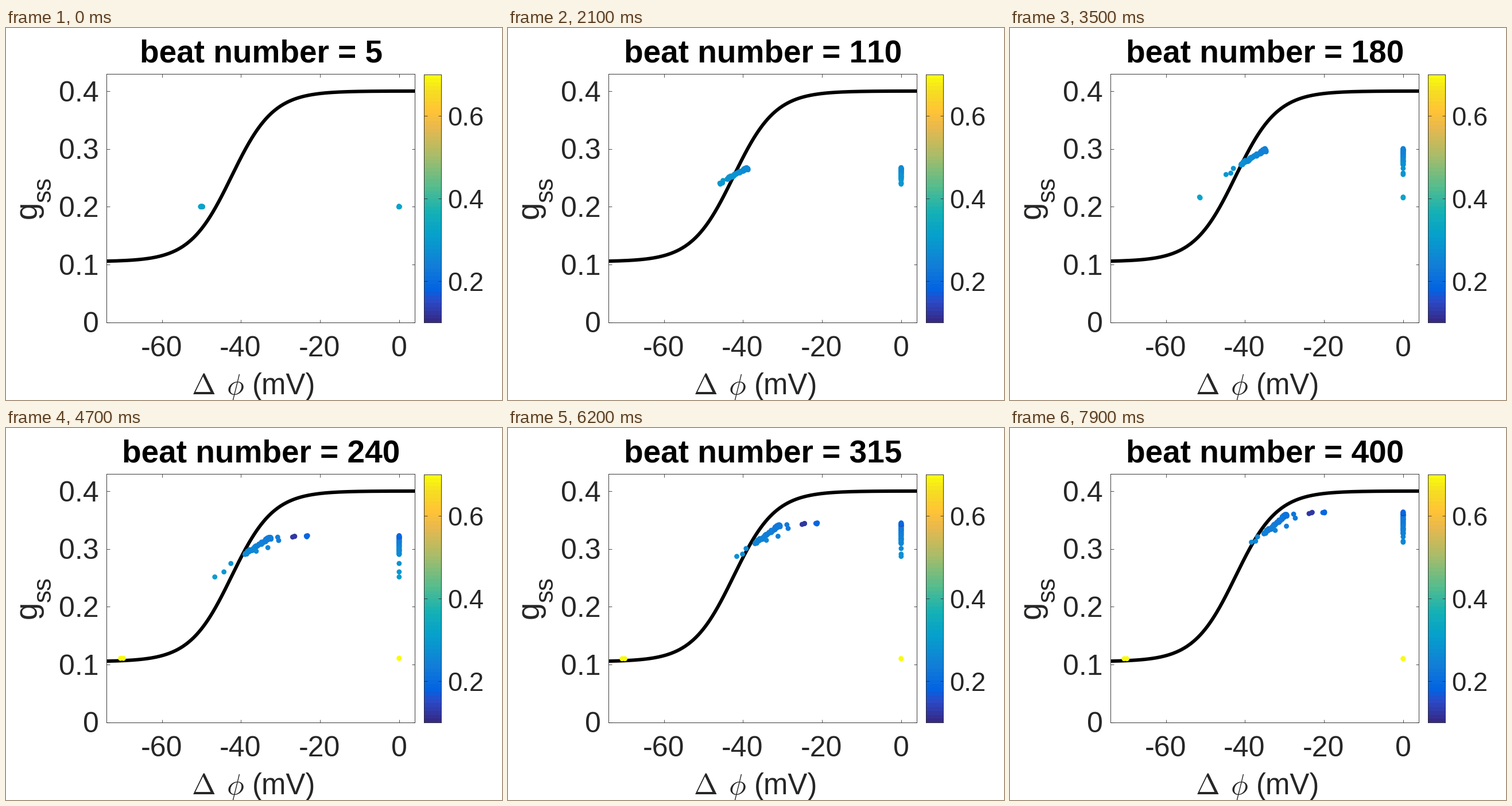
Recreate the animation shown at these times as a matplotlib script. Size 864 by 648 pixels, loop 8000 ms.

```python
import matplotlib.pyplot as plt
import numpy as np
from matplotlib.animation import FuncAnimation
from matplotlib.colors import LinearSegmentedColormap

W, H, DPI = 864, 648, 72          # at 72 dpi one point is one pixel
FRAMES, INTERVAL = 80, 100
INK = "#262626"

plt.rcParams["font.family"] = "Liberation Sans"
plt.rcParams["mathtext.fontset"] = "cm"
plt.rcParams["text.kerning_factor"] = 6   # practically no kerning

# colour stops on a 64-step scale
STOPS = [(0, "#352a87"), (5, "#2c4ac7"), (8, "#0363e1"), (14, "#127dd8"),
         (22, "#06a0cd"), (28, "#15b1b4"), (35, "#59bd8c"), (43, "#aebc67"),
         (50, "#e9b94e"), (54, "#ffc337"), (59, "#f5de21"), (63, "#f9fb0e")]
parula = LinearSegmentedColormap.from_list("p", [(k / 63, c) for k, c in STOPS], N=64)

# Cells are ranked by u: 0 to 1 is the main cloud, below 0 lags, above 1 leads.
# Some step sideways by dx once their neighbours fail; a few also change colour.
rng = np.random.default_rng(4)
CLOUD = [(u, 0, np.nan) for u in np.linspace(0, 1, 64)]
LAGGARDS = [(u, 0, np.nan) for u in (-.35, -.25, -.15)]
SIDE = [(.1, 2.2, np.nan), (.3, 3.2, np.nan), (.7, 3, np.nan), (1, 2, np.nan)]
DARK = [(1.15 + .1 * k, 5.8 + .3 * k, .12) for k in range(3)]
BLUE = [(1.15 + .1 * k, 9.2 + .3 * k, .185) for k in range(3)]
FAILING = [(-.35, 0, .7)] * 2

U, DX, FINAL = np.array(CLOUD + LAGGARDS + SIDE + DARK + BLUE + FAILING).T
FAILS = FINAL == .7
SHIFT = rng.uniform(-.25, .25, U.size)
NOISE = rng.normal(-.0003, .0012, U.size)
REST = np.where(np.arange(U.size) % 2, -70.6, -69.9)


def step(beat, centre, width):
    return 1 / (1 + np.exp((centre - beat) / width))


def pose(beat):
    t = beat - 5
    lag = (1 - U) ** 2
    x = -50 + SHIFT + (20 + 2 * U) * (1 - np.exp(-t / (150 + 150 * lag)))
    g = .2 + (.19 + .022 * U) * (1 - np.exp(-t / (280 + 80 * lag)))
    g += NOISE * min(t / 150, 1)

    # laggards fall behind for a while around the failure
    dip = np.where(FAILS, 0, np.minimum(U, 0)) * np.exp(-((beat - 250) / 60) ** 2)
    x += 14 * dip
    g += .08 * dip

    jump = step(beat, 212, 5)
    fall = step(beat, 188, 9.4)
    x += DX * jump
    value = .25 - .0048 * (x - DX * jump + 36)
    x = np.where(FAILS, x + fall * (REST - x), x)
    g = np.where(FAILS, g + fall * (.11 - g), g)
    turn = np.where(FAILS, fall ** 2, jump)
    value = np.where(np.isnan(FINAL), value, value + turn * (FINAL - value))
    return x, g, value


fig = plt.figure(figsize=(W / DPI, H / DPI), dpi=DPI, facecolor="white")


def label(x, y, s, size, **kw):
    kw = {"color": INK, "ha": "center", "va": "baseline", **kw}
    return fig.text(x / W, 1 - y / H, s, fontsize=size, **kw)


def panel(left, top, right, bottom):
    ax = fig.add_axes([left / W, 1 - bottom / H, (right - left) / W, (bottom - top) / H])
    ax.tick_params(direction="in", length=5.5, width=.8, color=INK, top=True, right=True,
                   labelbottom=False, labelleft=False)
    for s in ax.spines.values():
        s.set(color=INK, linewidth=.9)
    return ax


ax = panel(175.4, 79.6, 712.4, 512.6)
ax.set(xlim=(-74, 4), ylim=(0, .43), xticks=range(-60, 1, 20),
       yticks=np.arange(5) / 10)
v = np.linspace(-74, 4, 400)
ax.plot(v, .105 + .295 * step(v, -42.4, 5.3), color="black", lw=6)

for x in range(-60, 1, 20):
    label(684.5 + 6.88 * x - (x < 0), 572.5, str(x), 50)
for k in range(5):
    label(161.5, 530.5 - 100.7 * k, f"{k / 10:g}", 50, ha="right")

bar = panel(728.4, 80.6, 758.4, 512.6)
bar.imshow(np.arange(64)[:, None], cmap=parula, origin="lower", aspect="auto",
           extent=(0, 1, .1, .7), interpolation="nearest")
bar.set(xticks=[], yticks=[.2, .4, .6])
for c in (.2, .4, .6):
    label(769.5, 601.5 - 720 * c, f"{c:g}", 45.5, ha="left")

label(343.5, 638, r"$\Delta$", 50)
label(399.5, 638, r"$\phi$", 50)
label(484, 638, "(mV)", 51)
upright = dict(ha="left", rotation=90, rotation_mode="anchor")
label(53, 332, "g", 55, **upright)
label(78, 303, "ss", 44, **upright)

title = label(444.5, 60, "", 55, color="black", weight="bold")
style = dict(s=78, linewidths=0, cmap=parula, vmin=.1, vmax=.7, zorder=3)
zero = np.zeros(U.size)
cells = ax.scatter(zero, zero, c=zero, **style)
column = ax.scatter(zero, zero, c=zero, **style)


def draw(i):
    beat = 5 * (i + 1)
    x, g, value = pose(beat)
    title.set_text(f"beat number = {beat}")
    cells.set_offsets(np.column_stack([x, g]))
    column.set_offsets(np.column_stack([zero, g]))
    for dots in (cells, column):
        dots.set_array(value)
    return title, cells, column


anim = FuncAnimation(fig, draw, frames=FRAMES, interval=INTERVAL, repeat=True,
                     repeat_delay=0, blit=False)
plt.show()
```
